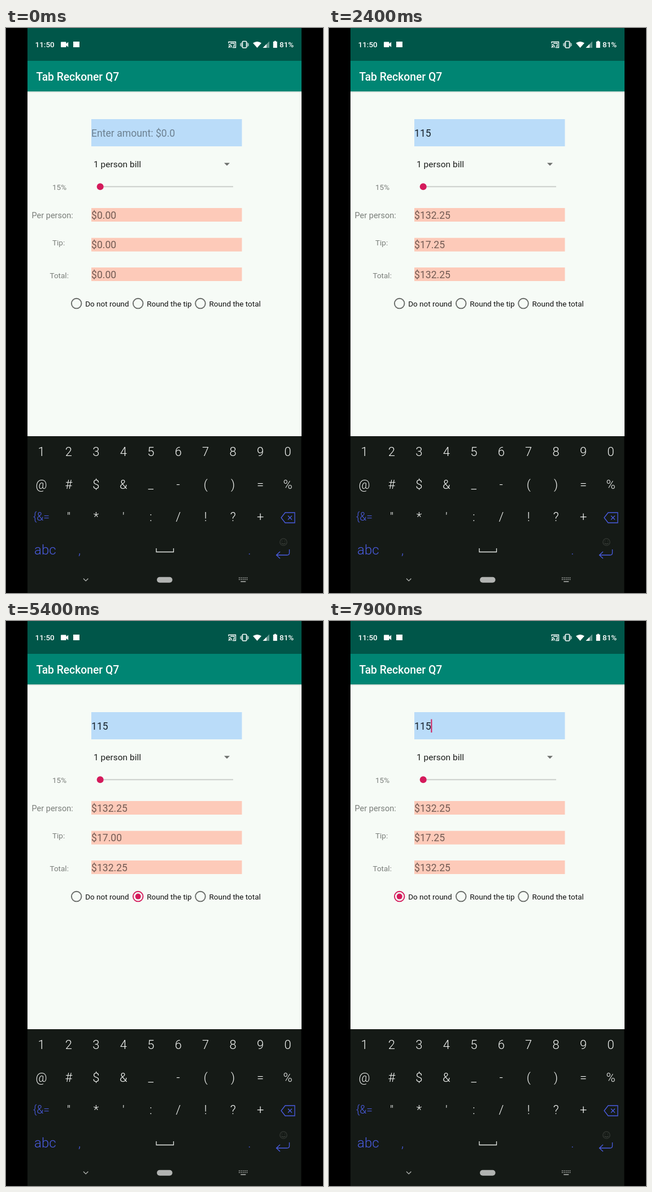
An HTML page that plays this animation: 561x998 px, repeating every 8000 ms.

```html
<!DOCTYPE html>
<html lang="en">
<head>
<meta charset="utf-8">
<title>Tab Reckoner</title>
<style>
  html, body { margin: 0; width: 100%; height: 100%; overflow: hidden; background: #000; }
  svg { display: block; width: 100vw; height: 100vh; }
  text { font-family: Roboto, sans-serif; white-space: pre; }
  .status { font-size: 13.5px; font-weight: 500; fill: #fff; }
  .label { font-size: 13.5px; fill: #7a7e7a; }
  .value { font-size: 17.6px; fill: rgba(0, 0, 0, .55); }
  .key { font-size: 22px; font-weight: 300; fill: #f2f4f2; text-anchor: middle; }
  .blue { fill: #4a5ce0; }
  .line { fill: none; stroke-width: 1.3; }
</style>
</head>
<body>
<svg viewBox="0 0 561 998">
  <rect width="561" height="998"/>
  <rect x="38" width="485" height="58" fill="#005649"/>
  <rect x="38" y="112" width="485" height="609" fill="#f6fbf6"/>
  <rect x="38" y="112" width="485" height="2" fill="#000" opacity=".1"/>
  <rect x="38" y="58" width="485" height="54" fill="#008573"/>

  <!-- Status bar -->
  <text class="status" x="51.5" y="34.3">11:50</text>
  <text class="status" x="484" y="34.3">81%</text>
  <g fill="#fff">
    <path d="M98 24.5h7.5q1 0 1 1v2.2l3.7-3v9l-3.7-3v2.3q0 1-1 1H98q-1 0-1-1v-7.500q0-1 1-1z"/>
    <rect x="119" y="24" width="11" height="10"/>
    <path d="M437 26.500Q444.500 21.500 452 26.500L444.500 35z"/>
    <path d="M466 23.500V35H454.500z" opacity=".4"/>
    <path d="M461 28.500V35H454.500z"/>
    <path d="M474.800 24v-1.200h3V24h2v11h-7V24z"/>
    <rect x="418.500" y="23.500" width="7" height="11.500" rx="1" fill="none" stroke="#fff" stroke-width="1.500"/>
    <path d="M415 27v5M429 27v5M416.800 25.500v8M427.200 25.500v8" stroke="#fff" stroke-width="1"/>
    <path class="line" stroke="#fff" d="M394 27v-2.500h12.500v10H401M394 29q5 0 5.500 5.500M394 31.500q2.700.3 3 3M397 27h7v5h-2"/>
    <circle cx="394.500" cy="34" r="1"/>
  </g>

  <!-- Form -->
  <text x="53.500" y="92.800" font-size="19.300" font-weight="500" fill="#fff">Tab Reckoner Q7</text>
  <rect x="151" y="161" width="266.500" height="48" fill="#badcf9"/>
  <text id="amount" class="value" x="151" y="191.700"></text>
  <rect id="cursor" y="173.500" width="2" height="23.500" fill="#d0245f"/>
  <text x="155" y="246.200" font-size="15.500" fill="#1c1e1c">1 person bill</text>
  <path d="M386 238.200h10l-5 5z" fill="#6d706d"/>
  <text class="label" x="82" y="286">15%</text>
  <path d="M167 280.200H402" stroke="#cbcfcb" stroke-width="2"/>
  <circle cx="166.700" cy="280.200" r="6" fill="#d41a5b"/>
  <text class="label" x="45.500" y="336" style="font-size:14.500px">Per person:</text>
  <text class="label" x="82" y="383.700">Tip:</text>
  <text class="label" x="77.500" y="441.700">Total:</text>
  <g id="results"></g>
  <g id="radios"></g>

  <!-- Keyboard -->
  <rect x="38" y="721" width="484.500" height="277" fill="#151a16"/>
  <g id="keys"></g>
  <text class="key blue" x="62.500" y="870" style="font-size:19.500px">{&amp;=</text>
  <text class="key blue" x="69.300" y="930" style="font-size:24px">abc</text>
  <text class="key blue" x="130" y="930">,</text>
  <text class="key blue" x="431" y="930">.</text>
  <g class="line" stroke="#4a5ce0">
    <path d="M487 865l7-9h17v18h-17zM499 861.500l7 7M506 861.500l-7 7"/>
    <path d="M501.500 921v6q0 4-4 4H479M485 925l-6.500 6 6.500 6"/>
  </g>
  <path class="line" stroke="#e4e6e4" d="M266 919v6.500h30.500V919"/>
  <g class="line" stroke="#343934">
    <circle cx="491" cy="908" r="6.200"/>
    <path d="M488.500 905.500v1.500M493.500 905.500v1.500M487.500 909.500q3.500 4 7 0"/>
  </g>
  <path class="line" stroke="#b4b7b4" d="M137 972.500l4.200 4.200 4.200-4.200"/>
  <rect x="267" y="969.700" width="27.500" height="10" rx="5" fill="#b2b4b2"/>
  <path d="M412 971.300h15.500M412 974.300h15.500" stroke="#b4b7b4" stroke-width="1.600" stroke-dasharray="1.700 1.700"/>
  <path d="M415.300 977.800h9" stroke="#b4b7b4" stroke-width="1.500"/>
</svg>
<script>
const DURATION = 8000;
const svg = document.querySelector('svg');
const byId = id => document.getElementById(id);
const clamp = x => Math.min(1, Math.max(0, x));
const easeOut = x => 1 - (1 - clamp(x)) ** 2;

function add(parent, tag, attributes, text = '') {
  const node = document.createElementNS(svg.namespaceURI, tag);
  for (const name in attributes) node.setAttribute(name, attributes[name]);
  node.textContent = text;
  parent.append(node);
  return node;
}

function set(node, attributes) {
  for (const name in attributes) node.setAttribute(name, attributes[name]);
}

[['1234567890', 756], ['@#$&_-()=%', 814], [' "*\':/!?+ ', 871]].forEach(([row, y]) =>
  [...row].forEach((key, i) => add(byId('keys'), 'text', { class: 'key', x: 62.5 + i * 48.45, y }, key)));

const results = [318, 370.7, 423].map(y => {
  add(byId('results'), 'rect', { x: 151, y, width: 266.5, height: 24, fill: '#fdcab9' });
  return add(byId('results'), 'text', { class: 'value', x: 151, y: y + 18.6 });
});

const radios = [[124.7, 'Do not round'], [233.7, 'Round the tip'], [344, 'Round the total']].map(([x, label]) => {
  const parent = byId('radios');
  const circle = attributes => add(parent, 'circle', { cx: x, cy: 486.6, ...attributes });
  add(parent, 'text', { x: x + 15.5, y: 492, 'font-size': 13.5, fill: '#111' }, label);
  return {
    x,
    ripple: circle({ fill: '#000' }),
    ring: circle({ r: 8.8, fill: 'none', 'stroke-width': 1.9 }),
    dot: circle({ fill: '#d41a5b' })
  };
});

const typing = [[1900, '115'], [1500, '11'], [1200, '1'], [0, '']];
const taps = [{ at: 4500, option: 1 }, { at: 5700, option: 2 }, { at: 6880, option: 0 }];
const CHECK_DELAY = 150;
const RIPPLE_TIME = 560;

function drawForm(time) {
  const amount = typing.find(([at]) => time >= at)[1];
  const field = byId('amount');
  field.textContent = amount || 'Enter amount: $0.0';
  field.style.fill = amount ? '#17212a' : 'rgba(0, 0, 0, .42)';

  // Each keystroke restarts the half-second blink.
  const blinkStart = time >= 1900 ? 1900 : time >= 1500 ? 1500 : 200;
  const visible = time >= blinkStart && Math.floor((time - blinkStart) / 500) % 2 === 0;
  set(byId('cursor'), {
    x: 151 + (amount ? field.getComputedTextLength() - 0.3 : 0),
    visibility: visible ? 'visible' : 'hidden'
  });

  const checked = taps.filter(tap => time >= tap.at + CHECK_DELAY).pop();
  const option = checked ? checked.option : -1;
  const tip = amount * 0.15;
  const total = amount * 1.15;
  const sums = [total, option === 1 ? Math.round(tip) : tip, option === 2 ? Math.round(total) : total];
  results.forEach((node, i) => node.textContent = '$' + sums[i].toFixed(2));
  drawRadios(time, option, checked);
}

function drawRadios(time, option, checked) {
  radios.forEach(({ x, ripple, ring, dot }, i) => {
    const on = i === option;
    ring.setAttribute('stroke', on ? '#d41a5b' : '#686b68');
    dot.setAttribute('r', on ? 5 * easeOut((time - checked.at - CHECK_DELAY) / 200) : 0);

    const age = time - taps.find(tap => tap.option === i).at;
    const active = age >= 0 && age < RIPPLE_TIME;
    const growth = easeOut(age / 250);
    set(ripple, {
      cx: x + 6 * (1 - growth),
      r: 8 + 15 * growth,
      opacity: active ? 0.11 * clamp(age / 80) * clamp((RIPPLE_TIME - age) / 300) : 0
    });
  });
}

function frame() {
  drawForm(performance.now() % DURATION);
  requestAnimationFrame(frame);
}
frame();
</script>
</body>
</html>
```
